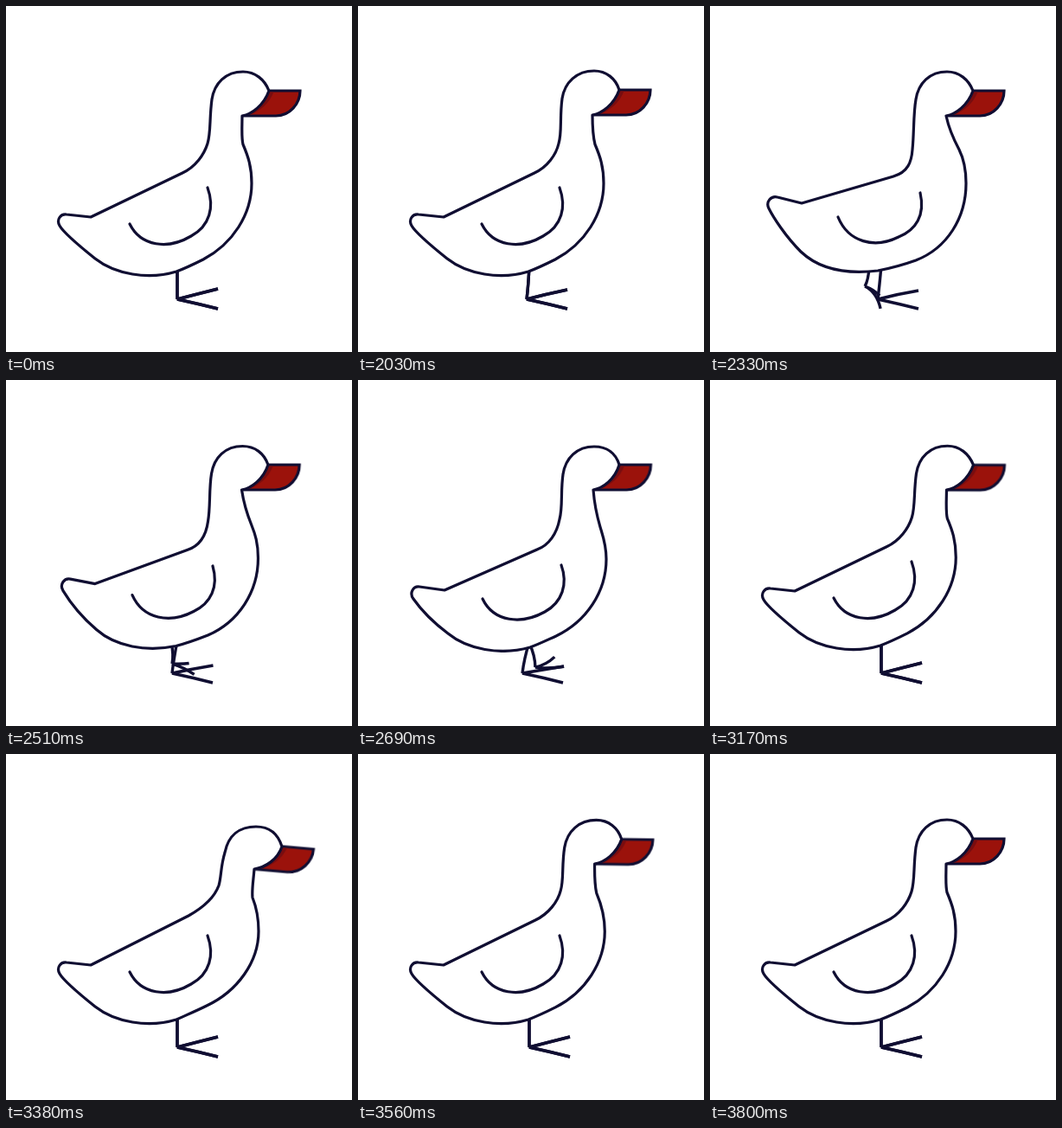
Write an HTML page without scripts that moves like this. It is 400 px wide and 400 px high and loops after 3830 ms.

```html
<!DOCTYPE html>
<html lang="en">
<head>
<meta charset="utf-8">
<title>Walking duck</title>
<style>
  html, body { margin: 0; width: 100%; height: 100%; overflow: hidden; background: #fff; }
  svg { display: block; width: 100%; height: 100%; }
  path { fill: none; stroke: #100e32; stroke-width: 3.2; }
  .body, .wing { stroke-linejoin: round; stroke-linecap: round; }
  .body { fill: #fff; }
  .bill { fill: #9b120b; }
  .shade { fill: #780d10; stroke: none; }
  .leg { stroke-width: 3.4; }

  .body, .wing, .beak, .leg { animation: 3830ms ease-in-out infinite; }
  .body { animation-name: body; }
  .wing { animation-name: wing; }
  .beak { animation-name: beak; transform-origin: 289px 112px; }
  .far { animation-name: far; }
  .near { animation-name: near; }

  /* rest, head back, stride, settle, second stride, fall, rest, bow, rest */
  @keyframes body {
    0%, 52.97%, 82%, 99.2%, 100% { d: path("M98 244L70 241C63 240 58 247 62 254C66 261 83 276 103 292C126 310 164 317 197 307C208 303 218 298 228 293C262 275 284 241 284 205C284 186 280 174 274 160C272 152 273 140 273 127C284 125 298 115 304 98C299 85 288 76 274 76C254 76 241 89 238 108C235 130 237 146 233 159C229 172 219 186 204 193Z"); }
    53%, 94.8% { d: path("M99 244L70 241C63 240 58 247 62 254C66 261 83 276 103 292C126 310 164 317 197 307C208 303 218 298 228 293C262 275 284 241 284 205C284 186 280 174 274 160C272 152 271 140 271 126C282 124 296 114 302 97C298 84 287 75 273 75C253 75 239 88 236 107C233 129 236 146 232 159C229 172 219 186 204 193Z"); }
    60.84% { d: path("M106 228L78 221C71 219 64 226 68 234C73 244 87 266 105 284C127 305 160 310 194 306C210 303 224 299 238 294C274 280 296 245 296 205C296 186 293 176 288 166C280 151 276 141 273 127C284 125 298 115 304 98C299 85 288 76 274 76C254 76 241 89 238 108C235 125 236 146 234 166C233 180 229 192 212 197Z"); }
    70.23% { d: path("M100 243L71 239C64 238 59 246 64 253C71 263 84 278 104 293C126 311 164 319 199 309C210 305 220 300 229 296C264 279 287 245 287 207C287 190 283 180 280 170C275 153 273 140 272 127C283 125 297 115 302 98C298 85 288 77 273 77C253 77 240 90 237 109C234 130 237 146 233 161C230 177 221 191 207 196Z"); }
    74.9% { animation-timing-function: ease-in; d: path("M104 232L76 226C69 224 62 232 67 239C72 249 87 270 106 286C128 307 162 313 196 307C210 303 223 300 235 294C271 279 294 244 294 206C294 188 290 177 285 166C277 151 271 138 267 123C279 121 292 111 298 94C293 80 282 73 268 73C248 73 235 86 232 105C229 127 231 146 231 165C230 180 226 192 211 197Z"); }
    78.07% { animation-timing-function: linear; d: path("M102 237L75 232C67 230 61 238 66 245C72 255 87 274 106 289C128 309 164 316 198 308C210 304 222 300 232 295C268 279 291 244 291 207C291 190 288 177 283 166C276 151 271 138 268 124C280 122 293 112 299 96C294 82 283 74 269 74C249 74 236 87 233 106C230 128 232 146 230 165C228 180 222 192 209 198Z"); }
    88.25% { d: path("M98 244L70 241C63 240 58 247 62 254C66 261 83 276 103 292C126 310 164 317 197 307C208 302 220 297 232 291C268 274 292 240 292 205C292 190 289 176 285 166C284 157 286 146 287 133C300 131 314 122 319 107C314 91 303 84 289 84C270 84 257 94 253 114C248 130 249 142 246 152C241 166 227 178 211 187Z"); }
  }

  @keyframes wing {
    0%, 53%, 82%, 100% { d: path("M233 210C241 232 236 254 214 266C187 282 156 278 143 252"); }
    60.84% { d: path("M243 216C249 242 238 259 218 267C190 281 160 273 148 244"); }
    70.23% { d: path("M235 214C243 236 236 257 216 268C189 283 157 280 144 253"); }
    74.9% { animation-timing-function: ease-in; d: path("M241 216C248 241 238 258 218 267C190 281 160 275 147 247"); }
    78.07% { animation-timing-function: linear; d: path("M239 216C246 241 238 257 218 268C190 282 159 277 146 250"); }
  }

  @keyframes beak {
    0%, 52.97%, 60.84%, 82%, 99.2%, 100% { transform: translate(0, 0) rotate(0deg); }
    53%, 94.8% { transform: translate(-2px, -1px) rotate(0deg); }
    70.23% { transform: translate(-1.5px, 0) rotate(0deg); }
    74.9% { animation-timing-function: ease-in; transform: translate(-6px, -4px) rotate(-2deg); }
    78.07% { animation-timing-function: linear; transform: translate(-5px, -2.5px) rotate(-1deg); }
    88.25% { transform: translate(14.5px, 7.5px) rotate(5deg); }
  }

  /* each leg: shin, then both toes meeting at the heel */
  @keyframes far {
    0%, 52.97%, 72.5%, 100% { d: path("M198 300Q198 323 198 339M245 327Q221 333 198 339Q221 344 245 350"); }
    53% { d: path("M198 300Q197 323 195 339M242 328Q218 333 195 339Q218 344 242 350"); }
    60.84% { animation-timing-function: linear; d: path("M184 302Q183 317 179 324M196 335Q190 328 179 324Q193 331 197 350"); }
    70.23% { animation-timing-function: linear; d: path("M198 304Q205 319 205 332M227 320Q218 329 205 332Q220 334 238 331"); }
  }

  @keyframes near {
    0%, 52.97%, 82%, 100% { d: path("M198 300Q198 323 198 339M245 327Q221 333 198 339Q221 344 245 350"); }
    53% { d: path("M198 300Q197 323 195 339M242 328Q218 333 195 339Q218 344 242 350"); }
    60.84% { d: path("M198 300Q196 323 194 339M241 329Q217 333 194 339Q217 344 241 350"); }
    70.23% { d: path("M198 303Q192 322 190 339M238 331Q214 335 190 339Q214 344 237 350"); }
    74.4% { animation-timing-function: linear; d: path("M186 302Q185 317 181 325M199 335Q192 328 181 325Q194 331 199 349"); }
    78.07% { animation-timing-function: linear; d: path("M195 302Q193 320 191 331M213 330Q202 330 191 331Q203 333 210 341"); }
  }
</style>
</head>
<body>
<svg viewBox="0 0 400 400" aria-label="A duck takes two steps and bows its head">
  <path class="leg far"/>
  <path class="leg near"/>
  <g class="beak">
    <path class="bill" d="M304 98H340C340 113 328 127 312 127H273C284 125 298 115 304 98Z"/>
    <path class="shade" d="M304 99.5H309.5C304 113 294 121 283 125.5H273C284 125 298 115 304 98Z"/>
  </g>
  <path class="body"/>
  <path class="wing"/>
</svg>
</body>
</html>
```
